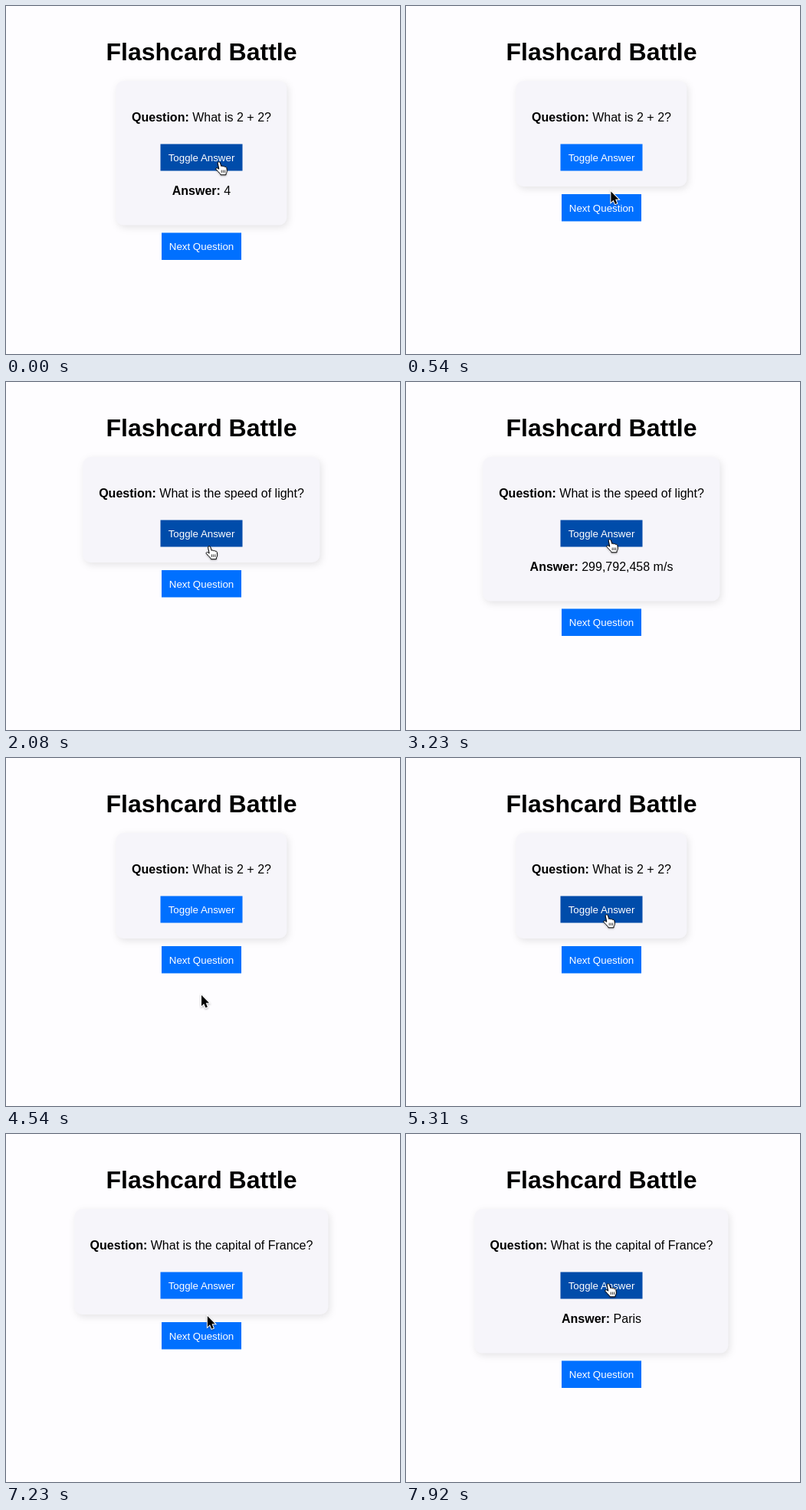
An HTML page that plays this animation: 514 by 455 pixels, repeating every 8000 ms.

```html
<!DOCTYPE html>
<html lang="en">
<head>
<meta charset="utf-8">
<title>Flashcards</title>
<style>
  html, body { margin: 0; width: 100%; height: 100%; overflow: hidden; background: #fefdff; }
  svg { display: block; font: 16px Arial, "Liberation Sans", sans-serif; text-anchor: middle; }
  h1, .title { font-size: 32px; font-weight: bold; }
  .bold { font-weight: bold; }
  .button { font-size: 13.333px; fill: #fff; }
  #card { fill: #f6f5fa; filter: drop-shadow(2px 3px 5px rgba(0, 0, 0, .1)); }
  #cursor { filter: drop-shadow(0 1px 1px rgba(0, 0, 0, .3)); }
</style>
</head>
<body>
<svg width="514" height="455" viewBox="0 0 514 455">
  <text class="title" x="255" y="71">Flashcard Battle</text>
  <rect id="card" y="98" rx="10"/>
  <text x="255" y="150.5"><tspan class="bold">Question:</tspan> <tspan id="question"></tspan></text>
  <rect id="toggle" x="201.5" y="180.5" width="107" height="35"/>
  <text class="button" x="255" y="202.5">Toggle Answer</text>
  <text id="answerLine" x="255" y="246.5"><tspan class="bold">Answer:</tspan> <tspan id="answer"></tspan></text>
  <g id="next">
    <rect id="nextBox" x="203" width="104" height="35.5"/>
    <text class="button" x="255" y="22.5">Next Question</text>
  </g>
  <g id="cursor">
    <path id="arrow" d="M0 0V14.2L3.2 11.2L5.5 16.6L7.9 15.6L5.7 10.3H10Z"
      stroke="#fff" stroke-width="2" paint-order="stroke"/>
    <g id="hand" fill="#fff" stroke="#000" stroke-linejoin="round">
      <path d="M-1.8 1.2C-1.8-.4 .8-.8 1.4 1L2.8 5.6C3.2 4.8 4.9 4.8 5.3 6C5.9 5.3 7.2 5.4 7.6 6.6C8.3 6 9.7 6.4 9.9 7.7L10.3 11C10.4 13 9.6 14 9 15V16.8H2L1.6 15.5C0 14-2 11.6-4 9.6C-4.9 8.4-3.2 7.2-1.9 8L-.2 9.2Z"/>
      <path d="M3.2 10.5V14M5.4 10.5V14M7.6 10.5V14" stroke-width=".8"/>
    </g>
  </g>
</svg>
<script>
const LOOP = 8000, STEP = 1000 / 13;
const el = id => document.getElementById(id);

const cards = [
  { question: "What is 2 + 2?", answer: "4", width: 223 },
  { question: "What is the speed of light?", answer: "299,792,458 m/s", width: 309 },
  { question: "What is the capital of France?", answer: "Paris", width: 331 }
];

// [time, card, answer shown]
const clicks = [
  [0, 0, true], [145, 0, false], [1225, 1, false], [2995, 1, true],
  [4455, 0, false], [6610, 2, false], [7765, 2, true]
];

// [start, end, x, y] of each pointer move
const moves = [
  [-1, 0, 278, 204], [160, 780, 262, 262], [1845, 2155, 266, 206],
  [3300, 4150, 255, 310], [4620, 5230, 262, 205], [5300, 5770, 262, 268],
  [6920, 7620, 264, 196]
];

function pointerAt(t) {
  let x = 0, y = 0;
  for (const [start, end, toX, toY] of moves) {
    const u = Math.min(1, Math.max(0, (t - start) / (end - start)));
    const s = u * u * (3 - 2 * u);
    x += (toX - x) * s;
    y += (toY - y) * s;
  }
  return [x, y];
}

function draw(t) {
  const [, index, open] = clicks.findLast(c => c[0] <= t);
  const { question, answer, width } = cards[index];
  const nextY = open ? 296.5 : 246;
  const [x, y] = pointerAt(t);
  const onToggle = y >= 180.5 && y <= 216;
  const onNext = y >= nextY && y <= nextY + 35.5;
  const color = hover => hover ? "#004caa" : "#0070ff";

  el("card").setAttribute("x", 254.8 - width / 2);
  el("card").setAttribute("width", width);
  el("card").setAttribute("height", open ? 188.5 : 138);
  el("question").textContent = question;
  el("answer").textContent = answer;
  el("answerLine").style.display = open ? "" : "none";
  el("toggle").setAttribute("fill", color(onToggle));
  el("nextBox").setAttribute("fill", color(onNext));
  el("next").setAttribute("transform", `translate(0 ${nextY})`);

  const hand = onToggle || onNext;
  el("hand").style.display = hand ? "" : "none";
  el("arrow").style.display = hand ? "none" : "";
  el("cursor").setAttribute("transform", `translate(${x} ${y})`);
}

const begin = performance.now();
function tick() {
  const t = (performance.now() - begin) % LOOP;
  draw(Math.floor((t + 4) / STEP) * STEP);
  requestAnimationFrame(tick);
}
tick();
</script>
</body>
</html>
```
